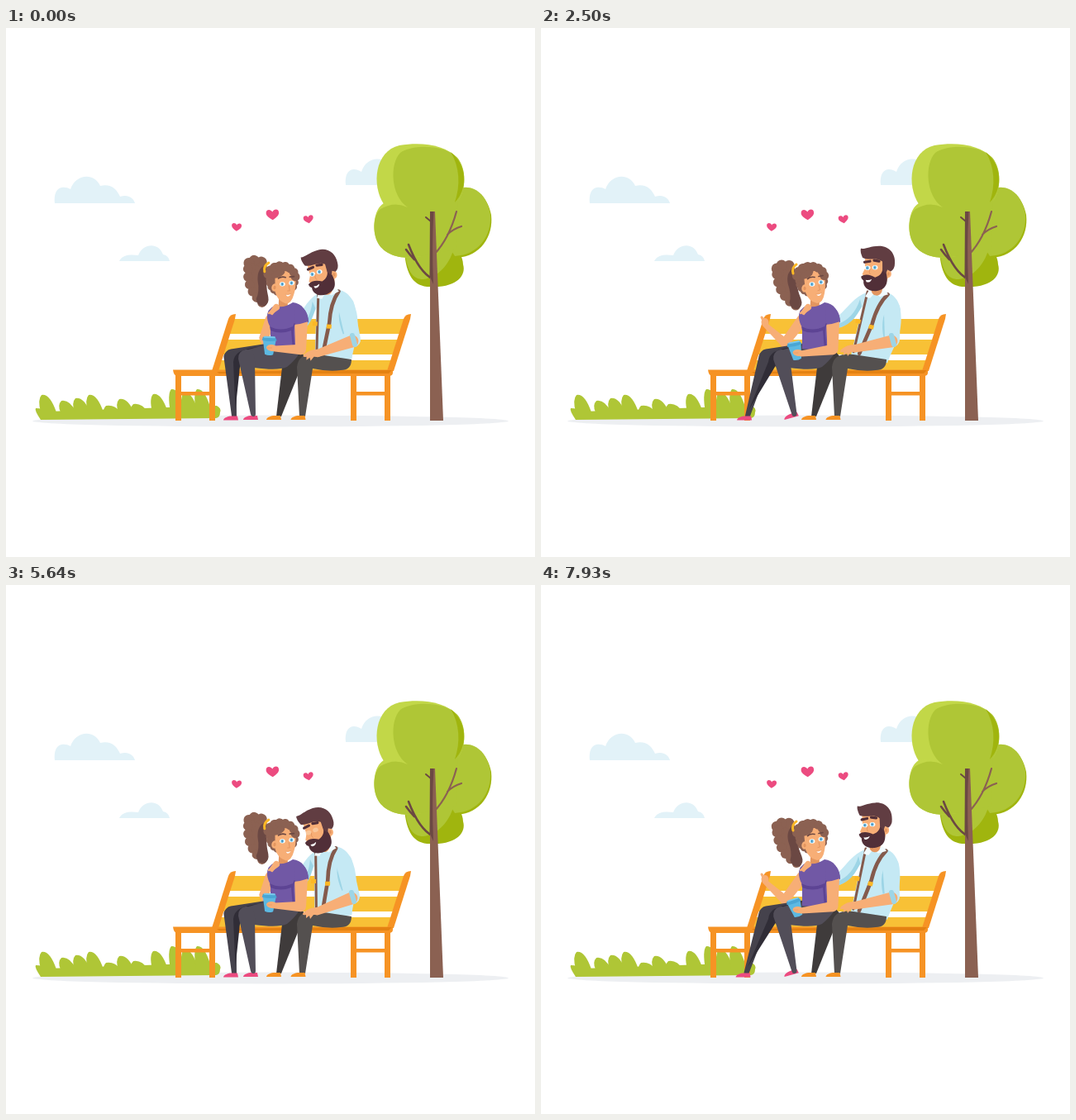
An HTML page with a canvas that plays this animation: 640 by 640 pixels, repeating every 8000 ms.

```html
<!DOCTYPE html>
<html lang="en">
<head>
<meta charset="utf-8">
<title>Couple on a bench</title>
<style>
  html, body { margin: 0; width: 100%; height: 100%; overflow: hidden; background: #fff; }
  canvas { display: block; width: 100%; height: 100%; }
</style>
</head>
<body>
<canvas id="stage"></canvas>
<script>
const canvas = document.getElementById('stage');
const ctx = canvas.getContext('2d');
const SIZE = 640, LOOP = 8000, CYCLE = 6000;
const ratio = Math.max(1, window.devicePixelRatio || 1);
canvas.width = canvas.height = SIZE * ratio;

const C = {
  green: '#afc636', lime: '#c2d748', olive: '#a0b50e', cloud: '#e2f2f8', ground: '#edeff2',
  wood: '#f69324', woodDark: '#e48212', slat: '#f8c136', trunk: '#8b6152', bark: '#6b4843',
  heart: '#ec4b80', skin: '#f7ae76', skinDark: '#e3955f', shirt: '#c5e9f4', shirtDark: '#9dd5e6',
  hair: '#613d42', beard: '#512f38', strap: '#845a4c', gold: '#fcb826',
  pants: '#54504f', pantsDark: '#3f3b3b', top: '#7158a5', topDark: '#5d4494',
  legNear: '#524e59', legFar: '#45424c', legShade: '#302d37', cup: '#5db9e2', lid: '#4aa6d4'
};

// ---- drawing helpers ----
function fill(d, color) { ctx.fillStyle = color; ctx.fill(new Path2D(d)); }
function line(d, width, color) {
  ctx.lineWidth = width; ctx.strokeStyle = color;
  ctx.lineCap = ctx.lineJoin = 'round';
  ctx.stroke(new Path2D(d));
}
function oval(x, y, rx, ry, color, rot = 0) {
  ctx.fillStyle = color; ctx.beginPath();
  ctx.ellipse(x, y, rx, ry, rot, 0, 7); ctx.fill();
}
function box(x, y, w, h, color) { ctx.fillStyle = color; ctx.fillRect(x, y, w, h); }
function taper(x1, y1, w1, x2, y2, w2, color) {
  const a = Math.atan2(y2 - y1, x2 - x1), q = Math.PI / 2;
  ctx.fillStyle = color; ctx.beginPath();
  ctx.arc(x1, y1, w1 / 2, a + q, a - q);
  ctx.arc(x2, y2, w2 / 2, a - q, a + q);
  ctx.closePath(); ctx.fill();
}
// Row of round curls along an elliptic arc, angles in degrees.
function curls(cx, cy, rx, ry, from, to, count, r, color) {
  for (let i = 0; i < count; i++) {
    const a = (from + (to - from) * i / (count - 1)) * Math.PI / 180;
    oval(cx + rx * Math.cos(a), cy + ry * Math.sin(a), r, r, color);
  }
}
// Draws in stage coordinates, turned about (px,py) and moved by (dx,dy).
function pivot(px, py, deg, dx, dy, draw) {
  ctx.save();
  ctx.translate(px + dx, py + dy); ctx.rotate(deg * Math.PI / 180); ctx.translate(-px, -py);
  draw();
  ctx.restore();
}
function turn(px, py, deg, x, y) {
  const a = deg * Math.PI / 180, c = Math.cos(a), s = Math.sin(a);
  return [px + (x - px) * c - (y - py) * s, py + (x - px) * s + (y - py) * c];
}

// ---- motion ----
const mix = (a, b, p) => a + (b - a) * p;
function ease(from, to, u) {
  const s = Math.min(1, Math.max(0, (u - from) / (to - from)));
  return s * s * (3 - 2 * s);
}
// 1 while leaning together, 0 while apart.
const together = (u, out, outEnd, back, backEnd) => 1 - ease(out, outEnd, u) + ease(back, backEnd, u);

function pose(u) {
  const early = u > 5000 ? u - CYCLE : u;
  const man = u > 5000 ? 1 - ease(-300, 850, early) : together(u, -300, 850, 2650, 3800);
  const body = together(u, 0, 1500, 2650, 4400);
  const arm = together(u, 0, 900, 2650, 3800);
  const feet = together(u, 0, 900, 2550, 4900);
  const raise = ease(700, 1450, u) - ease(2650, 3400, u);
  const sway = Math.sin((u - 1100) / 2200 * 2 * Math.PI);
  const nod = Math.exp(-(((u - 3750) / 350) ** 2));
  return {
    man: {
      lean: man, angle: mix(-sway, -13, man),
      x: mix(-1.6 - 1.2 * sway, -21.5, man), y: mix(.7, 6.5, man),
      rot: mix(-1.9 - 1.9 * sway, -18.5, man)
    },
    body: 4 * body,
    head: { x: 4.5 * body, rot: 5.5 * body + 4.5 * nod, pony: 4 * body + 3 * nod - sway * (1 - body) },
    hand: [mix(mix(264, 271, raise), 314, arm), mix(mix(371, 355, raise), 381, arm)],
    elbow: [mix(295, 312, arm), mix(381, 375, arm)],
    cup: [mix(308, 318.5, arm), mix(390, 384, arm), mix(-15 - 5 * sway, 2, arm)],
    near: { x: mix(294.5, 287, feet), deg: mix(-15, 0, feet) },
    far: mix(236.3 - sway, 263, feet),
    blink: [1430, 5640].some(b => Math.abs(u - b) < 90)
  };
}

// ---- scenery ----
function clouds() {
  fill('M59 212C57 192 69 190 78 195C84 177 106 174 114 191C127 188 134 195 138 204C147 201 154 205 156 212Z', C.cloud);
  fill('M137 282C141 274 151 274 160 275C165 261 184 258 190 274C195 275 197 278 198 282Z', C.cloud);
  fill('M411 190C409 172 419 167 430 174C435 158 452 154 462 164L470 190Z', C.cloud);
}
function heart(x, y, w, deg) {
  pivot(0, 0, deg, x, y, () => {
    ctx.scale(w / 16, w / 16);
    fill('M0 6.5C-5 3 -8 1 -8 -2.5C-8 -7.5 -2 -7.5 0 -3.5C2 -7.5 8 -7.5 8 -2.5C8 1 5 3 0 6.5Z', C.heart);
  });
}
function bush() {
  fill('M42 474Q34 462 36 460Q44 460 50 464L255 457Q261 460 259 465Q259 471 254 472Z', C.green);
  const peaks = [[47, 444], [71, 451], [88, 448], [104, 444], [125, 457], [141, 449],
    [158, 455], [182, 443], [204, 437], [219, 441], [235, 437]];
  for (const [x, y] of peaks) {
    fill(`M${x - 4} ${y}Q${x + 6} ${y - 2} ${x + 14} 465H${x - 5}Q${x - 9} ${y + 5} ${x - 4} ${y}Z`, C.green);
  }
}
function tree() {
  fill('M482 270C484 300 494 314 515 313C546 314 557 299 553 286C553 276 546 270 543 262Z', C.olive);
  fill('M482 270C486 294 491 304 505 304C522 302 538 286 543 262Z', C.green);
  const right = 'M548 196C566 190 582 202 587 226C590 252 574 276 546 278L525 250Z';
  fill(right, C.olive);
  pivot(548, 196, 2, 0, -2, () => fill(right, C.green));
  fill('M457 213C442 190 446 149 476 142C504 137 532 142 546 157C557 170 557 195 547 209C520 235 480 235 457 213Z', C.lime);
  fill('M457 212C444 220 443 245 449 258C457 276 482 281 502 276L520 240L486 217Q470 210 457 212Z', C.lime);
  fill('M486 217C465 203 464 164 477 151C490 141 530 140 546 157C557 170 557 195 547 209L545 268L502 276' +
    'C482 281 457 276 449 258C443 244 445 226 453 219Q470 209 486 217Z', C.green);
  fill('M538 150C558 166 559 195 543 211C550 190 549 168 538 150Z', C.olive);
  line('M517 304Q500 296 487 262M494 280Q489 275 484 268', 2.6, C.bark);
  line('M518 274Q536 255 545 222M534 250Q541 243 551 240', 2.2, C.trunk);
  line('M514 234L508 229', 2, C.bark);
  fill('M513 222H519L529 475H513Z', C.trunk);
  fill('M513 222H517.5Q515 262 517 310L512.5 300Z', C.bark);
}
function bench() {
  for (const [y, h] of [[352, 18], [377, 18], [402, 13]]) {
    const x = 276 - (y - 352) * .32;
    fill(`M${x} ${y}h207l${-h * .32} ${h}h-207Z`, C.slat);
  }
  for (const x of [0, 212]) {
    fill(`M${278 + x} 346Q${271 + x} 346 ${269 + x} 352L${249 + x} 415H${257 + x}L${277 + x} 352Z`, C.wood);
    for (const leg of [205, 246]) box(leg + x, 420, 7, 55, C.wood);
    box(212 + x, 440, 34, 4.5, C.wood);
  }
  fill('M202 413.5H468V417Q468 421 463 421H207Q203 421 202 413.5Z', C.wood);
  fill('M255 416L417 414H467L463 418H258Z', C.woodDark);
}
function shoe(x, y, color, deg = 0) {
  pivot(0, 0, deg, x, y, () => fill('M0 0C0 -3 6 -5 10 -5L17 -5L18 0Z', color));
}
function eye(x, y, closed) {
  oval(x, y, 3.4, 2.7, closed ? '#f9c79b' : '#fff');
  if (closed) return;
  oval(x - .2, y, 2, 2.2, '#6fbfe6');
  oval(x - .2, y, .7, .8, '#3b6a92');
}
function ear(x, y) {
  oval(x, y, 3.7, 4.7, C.skin, .1);
  oval(x, y, 1.6, 2.3, C.skinDark, .1);
}

// ---- man ----
const HIP = [393, 405], CHIN = [403, 317];
function manBody({ angle }) {
  pivot(...HIP, angle, 0, 0, () => {
    fill('M393 320C378 325 369 340 360 348L360 363C373 360 382 344 389 336Z', C.shirt);
    fill('M385 328C380 345 370 354 360 358L360 363C376 359 383 345 387 337Z', C.shirtDark);
    fill('M392 320L416 319C430 323 435 335 435 352C435 374 424 390 419 405L374 400Z', C.shirt);
    fill('M423 331C412 343 411 358 414 374L421 372C418 355 419 343 423 331Z', C.shirtDark);
    line('M394 319L378 392', 3, C.strap);
    line('M418.5 322C408 332 403 346 400 358L385 394', 4.6, C.strap);
    for (const [x, y] of [[383, 355], [399, 361.5]]) pivot(0, 0, 14, x, y, () => box(-3, -2.5, 6, 5, C.gold));
    fill('M391 325L396 317L415 317L419 322L409 325L403 320L397 327Z', '#f1fafd');
  });
}
function manNeck({ angle, x, y, rot }) {
  const [nx, ny] = turn(...HIP, angle, 405, 317);
  const [jx, jy] = turn(...CHIN, rot, 408, 308);
  taper(jx + x, jy + y, 14, nx, ny, 13, C.skinDark);
}
function manLegs() {
  fill('M356 391Q341 394 335 402L327 470H333L362 398Z', C.pantsDark);
  fill('M418 401Q418 414 405 414Q390 416 371 412L362 470H355L352 410Q354 392 378 395Z', C.pants);
  shoe(315, 474, C.wood);
  shoe(344.5, 474, C.wood);
}
function manArm({ angle, lean }) {
  const [sx, sy] = turn(...HIP, angle, 424, 340);
  const ex = 425 - 6 * lean, ey = 377;
  taper(sx, sy, 20, ex, ey, 18, C.shirt);
  pivot(0, 0, 0, 371 - 3 * lean, 390 + 7 * lean, () => {
    taper(53 - 3 * lean, -11 - 7 * lean, 15, 8, -2, 9, C.skin);
    fill('M10 -7Q0 -8 -8 -1Q-11 3 -5 2L-5 6L-1 3L0 7L4 2L11 2Z', C.skin);
  });
  taper(ex - 1, ey - 5, 6, ex + 2, ey + 6, 6, C.shirtDark);
}
function manHead({ x, y, rot }, closed) {
  pivot(...CHIN, rot, x, y, () => {
    fill('M393 277H416L422 298L417 311H395L392 300L389.5 297L393 290Z', C.skin);
    ear(421, 297);
    fill('M388 300C393 296 400 298 405 301C412 299 414 295 415 288L418 294C421 304 421 316 406 317.5C396 318 390 312 391 305Q388 303 388 300Z', C.beard);
    fill('M393.5 304Q398 305 401 303Q399 308 394.5 306.5Z', '#fff');
    eye(396, 289.5, closed);
    eye(405, 289, closed);
    line('M392.5 282.5L399 281.5M404 280.5L410 281.5', 3.2, C.beard);
    line('M399 291Q397 295 399 297', .9, C.skinDark);
    fill('M388 266C394 267 399 263 410 263C423 263 430 273 429 284Q429 291 424 294L420 292L418 297L414 292V282C407 276 397 281 390 277Q387 270 388 266Z', C.hair);
  });
}

// ---- woman ----
function farArm([ex, ey], [hx, hy], body) {
  taper(316 + body, 353, 13, ex, ey, 11, C.skin);
  taper(ex, ey, 11, hx, hy + 4, 6, C.skin);
  oval(hx, hy + 1, 4.5, 5, C.skin);
  taper(hx - 1, hy, 4, hx - 4, hy - 5, 3, C.skin);
}
function womanLegs(near, far) {
  taper(322, 391, 20, 273, 397, 17, C.legFar);
  taper(271, 398, 15, far + 13, 469, 6, C.legFar);
  fill(`M306 386Q276 388 275 404L${far + 14.5} 462L283 410Z`, C.legShade);
  shoe(far, 474.5, C.heart);
  shoe(near.x, 474, C.heart, near.deg);
  fill('M356 391L318 384Q292 387 283 395L300 411Q330 415 340 410Q350 402 356 392Z', C.legNear);
  taper(291, 399, 20, near.x + 12, 467, 6, C.legNear);
}
function womanTorso() {
  taper(332, 322, 11, 331, 339, 11, C.skinDark);
  fill('M321 336Q311 340 312 351Q313 358 316 362L316 388L346 391L347 360L362 356C361 342 354 333 343 332Q331 340 321 336Z', C.top);
  fill('M315 361Q328 368 343 361L346 391L343 390L341 366Q328 371 316 366Z', C.topDark);
}
function cup([x, y, deg]) {
  pivot(0, 0, deg, x, y, () => {
    fill('M-8 -7H8L5 11Q0 13 -5 11Z', C.cup);
    fill('M-9 -6L-8 -10H7L9 -6Q0 -4 -9 -6Z', C.lid);
    line('M-6 -10H6', 2, '#79c9ec');
  });
}
function nearArm(body, [cx, cy]) {
  const elbow = 353 + body * .9;
  taper(353 + body, 355, 16, elbow, 388, 13, C.skin);
  taper(elbow, 389, 12.5, cx + 7, cy + 4, 7, C.skin);
  oval(cx + 3, cy + 3, 6.5, 4, C.skin, .1);
  line(`M${cx - 2} ${cy + 3}h5`, .6, C.skinDark);
}
function shoulders() {
  fill('M345 337Q361 336 362 355Q354 358 344 359Z', C.top);
  line('M345 358Q342 366 343 378', 1.5, C.topDark);
  taper(317, 344, 5, 323, 338, 8, C.skin);
  line('M314 345L318 342M318 346L321 342', 2.2, C.skin);
}
function ponytail() {
  fill('M307 291L291 283Q281 293 284 303L297 329L309 339L314 331L308 303Z', C.trunk);
  curls(295, 293, 10, 6, -60, -220, 4, 6.5, C.trunk);
  curls(325, 294, 40, 46, 174, 114, 6, 5.8, C.trunk);
  fill('M306 290Q296 296 299 310Q304 324 301 333Q304 342 312 340Q318 336 315 328Q308 312 309 296Z', C.bark);
}
function womanHead({ x, rot, pony }) {
  pivot(330, 330, rot, x, 0, () => {
    pivot(307, 291, pony, 0, -.4 * pony, ponytail);
    oval(323, 300, 16, 16, C.trunk);
    curls(328, 306, 16, 15, 180, 110, 5, 4.4, C.trunk);
    curls(328, 306, 15, 15, -20, 45, 4, 4.2, C.trunk);
    fill('M318 299Q330 289 343 299Q345 312 343 321Q341 333 334 333Q324 331 320 320Z', C.skin);
    ear(319, 315);
    oval(320, 297, 10, 6, C.trunk, -.4);
    curls(326, 302, 17, 14, 190, 350, 8, 5.4, C.trunk);
    eye(328, 310);
    eye(339, 307.5);
    line('M322.5 303.5Q326 300.5 331 301.5M336 300.5L341 299.5', 1.7, C.bark);
    line('M336 311L337.5 317L335 317.5', 1, C.skinDark);
    fill('M333 322Q336 323 339.5 320.5Q338 324.5 335 324Z', '#fff');
    line('M333 322Q336 323 339.5 320.5', .6, C.skinDark);
    line('M305 297Q303 290 309 286', 3, C.gold);
  });
}
function woman(p) {
  farArm(p.elbow, p.hand, p.body);
  womanLegs(p.near, p.far);
  pivot(0, 0, 0, p.body, 0, womanTorso);
  cup(p.cup);
  nearArm(p.body, p.cup);
  pivot(0, 0, 0, p.body, 0, shoulders);
  womanHead(p.head);
}

function draw(t) {
  const p = pose((t % LOOP) % CYCLE);
  ctx.setTransform(ratio, 0, 0, ratio, 0, 0);
  box(0, 0, SIZE, SIZE, '#fff');
  clouds();
  oval(320, 475.5, 288, 7, C.ground);
  heart(279, 241, 12, 3);
  heart(322.5, 226, 15.5, -3);
  heart(366, 231.5, 12, -10);
  bush();
  tree();
  bench();
  manBody(p.man);
  manNeck(p.man);
  manLegs();
  woman(p);
  manArm(p.man);
  manHead(p.man, p.blink);
}

const start = performance.now();
function tick() {
  draw(performance.now() - start);
  requestAnimationFrame(tick);
}
tick();
</script>
</body>
</html>
```
